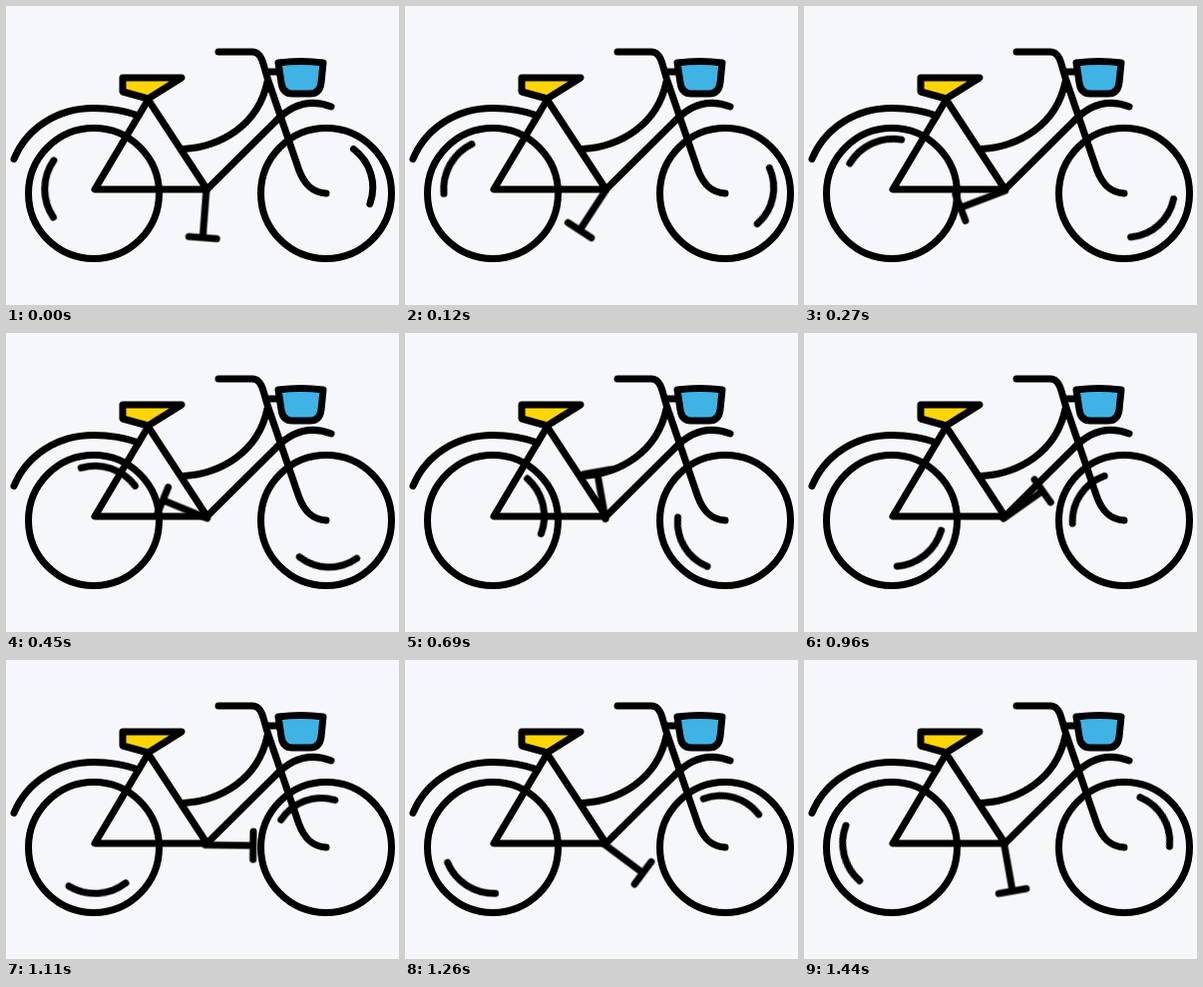
An HTML page that plays this animation: 394 px wide and 300 px high, repeating every 1470 ms.

```html
<!DOCTYPE html>
<html lang="en">
<head>
<meta charset="utf-8">
<title>Bicycle</title>
<style>
  html, body { margin: 0; width: 100%; height: 100%; overflow: hidden; background: #f5f7fb; }
  svg { display: block; width: 100vw; height: 100vh; }
  .ink { fill: none; stroke: #000; stroke-width: 7; stroke-linecap: round; stroke-linejoin: round; }
  .spin { transform-origin: 0 0; }
</style>
</head>
<body>
<svg viewBox="0 0 394 300">
  <g class="ink">
    <!-- wheels -->
    <circle cx="88" cy="188" r="65.5"/>
    <circle cx="321" cy="188" r="65.5"/>
    <g transform="translate(89.2 183.8)">
      <path class="spin" d="M-41.8 28.2 A50.4 50.4 0 0 1 -41.3 -28.9"/>
    </g>
    <g transform="translate(320 186)">
      <path class="spin" d="M28.4 -42.5 A48.2 48.2 0 0 1 44.8 12.6"/>
    </g>

    <!-- frame and mudguards -->
    <path d="M8 153.5 C21 122 52 102.5 88 102.5 C104 102.5 119 105 133 110"/>
    <path d="M142.5 94 L89 184 H201.500 Z"/>
    <path d="M201.500 184 L270 116 C286 99 304 92.500 326 101"/>
    <path d="M178 143.500 C215 141 253 120 262 76"/>

    <!-- handlebar and fork -->
    <path d="M213 46 H247 C253 46 256 51 258 58 L262 72 L293.500 164 C299 179 307 187 321 188"/>
    <path d="M262 66 H272"/>

    <!-- basket and saddle -->
    <path fill="#3fb3e5" d="M273 57 Q295.500 54 318 57 L316 77 Q314.500 88 305 88 H287 Q277.500 88 276 77 Z"/>
    <path fill="#ffd500" d="M117 72 H176 L142.500 93 L117 86 Z"/>

    <!-- crank and pedal -->
    <g transform="translate(200.800 185.600) rotate(4.3)">
      <path class="spin" d="M0 -1 V47 M-14 47 H14"/>
    </g>
  </g>
</svg>
<script>
  const STEPS = 49, STEP_MS = 30, STEP_DEG = 7.2;

  for (const part of document.querySelectorAll('.spin')) {
    part.animate(
      { transform: ['rotate(0deg)', `rotate(${STEPS * STEP_DEG}deg)`] },
      { duration: STEPS * STEP_MS, iterations: Infinity, easing: `steps(${STEPS}, end)` }
    );
  }
</script>
</body>
</html>
```
